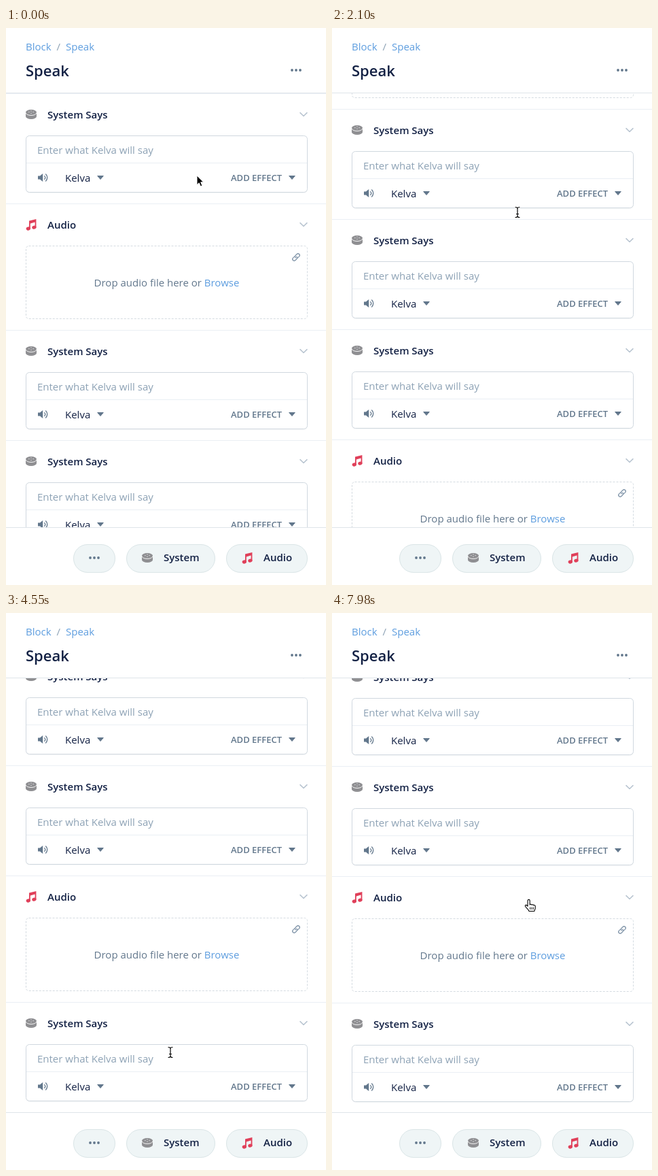
Animation of 471 by 819 pixels, one loop 8000 ms. Source, as an HTML page:

```html
<!DOCTYPE html>
<html lang="en">
<head>
<meta charset="utf-8">
<title>Speak block editor</title>
<style>
  html, body { margin: 0; height: 100%; overflow: hidden; background: #fff; }
  svg { display: block; width: 471px; height: 819px; font: 15px "Open Sans", sans-serif; }
  .strong { font-weight: 600; fill: #132144; }
  .link { fill: #5d9ddf; }
  .slate { fill: #62778c; }
  .hint { fill: #8da2b5; }
  .rule { stroke: #eaeff4; }
  .card { fill: #fff; stroke: #d0d8df; }
  .drop { fill: none; stroke: #d4dbe1; stroke-dasharray: 3 2; }
  .pill { fill: #eff5f6; stroke: #dae5e7; }
  .thin { fill: none; stroke: #8296aa; stroke-width: 1.3; stroke-linecap: round; }
  .back { fill: #fff; }
  .held .back { filter: drop-shadow(0 2px 6px #13214430); }
</style>
</head>
<body>
<svg viewBox="0 0 471 819">
  <defs>
    <clipPath id="view"><path d="M0 96H471V734H0z"/></clipPath>

    <g id="puck">
      <path d="M-8-3a8 4 0 0 1 16 0v6a8 4 0 0 1-16 0z" fill="#8f8f92"/>
      <path d="M-8-2.5a8 4 0 0 0 16 0" fill="none" stroke="#fff" stroke-width=".9"/>
      <path d="M-4-3.4h1.6M2.4-3.4h1.6M-.8-5h1.6M-.8-1.6h1.6" stroke="#d9d9dc"/>
    </g>
    <g id="note" fill="#e0405a">
      <path d="M-3-5.4 7.4-8V4.4H5.6V-3.4L-1.2-1.6V6.2H-3z"/>
      <ellipse cx="-4.2" cy="6" rx="3.2" ry="2.5" transform="rotate(-15 -4.2 6)"/>
      <ellipse cx="4.4" cy="4.2" rx="3.2" ry="2.5" transform="rotate(-15 4.4 4.2)"/>
    </g>
    <path id="chevron" d="M-5-2.3 0 2.5 5-2.3" fill="none" stroke="#b9c5d1" stroke-width="1.6" stroke-linecap="round" stroke-linejoin="round"/>
    <path id="caret" d="M-4.3-2.5H4.3L0 2.5z" fill="#62778c" stroke="#62778c" stroke-linejoin="round"/>
    <g id="speaker">
      <path d="M-7-2.6h3L.2-6V6L-4 2.6h-3z" fill="#62778c"/>
      <path class="thin" d="M2.6-2.4a3.4 3.4 0 0 1 0 4.8M4.6-5a7 7 0 0 1 0 10" style="stroke:#62778c"/>
    </g>
    <g id="chain" class="thin" transform="rotate(-45)">
      <path d="M-.8-2.4H-4a2.4 2.4 0 0 0 0 4.8h2.6a2.4 2.4 0 0 0 2.4-2.4"/>
      <path d="M.8 2.4H4a2.4 2.4 0 0 0 0-4.8H1.4A2.4 2.4 0 0 0-1 0"/>
    </g>
    <g id="dots" class="slate"><circle cx="-6" r="1.9"/><circle r="1.9"/><circle cx="6" r="1.9"/></g>

    <g id="system">
      <path class="back" d="M0 0H471V162H0z"/>
      <path class="rule" d="M0 .5H471"/>
      <use href="#puck" x="37" y="31"/>
      <text class="strong" x="61" y="37">System Says</text>
      <use href="#chevron" x="438" y="31"/>
      <rect x="29.5" y="63.5" width="414" height="83" rx="5" fill="#13214412"/>
      <rect class="card" x="29.5" y="62.5" width="414" height="83" rx="5"/>
      <path class="rule" d="M30 102.5H443"/>
      <text class="hint" x="46" y="89">Enter what Kelva will say</text>
      <use href="#speaker" x="54" y="124"/>
      <text x="87" y="130" fill="#132144">Kelva</text>
      <use href="#caret" x="139" y="124"/>
      <text class="slate" x="331" y="129" font-size="13" font-weight="600">ADD EFFECT</text>
      <use href="#caret" x="421" y="124"/>
    </g>
    <g id="audio">
      <path class="back" d="M0 0H471V186H0z"/>
      <path class="rule" d="M0 .5H471"/>
      <use href="#note" x="37" y="31"/>
      <text class="strong" x="61" y="37">Audio</text>
      <use href="#chevron" x="438" y="31"/>
      <rect class="drop" x="29.5" y="62.5" width="414" height="107" rx="4"/>
      <use href="#chain" x="427" y="79"/>
      <text class="slate" x="236.5" y="122" text-anchor="middle">Drop audio file here or <tspan class="link">Browse</tspan></text>
    </g>

    <path id="arrow" d="M0 0V13.6L3.2 10.7 5.4 15.8 7.8 14.8 5.7 9.8H9.8z" stroke="#fff"/>
    <g id="hand" stroke="#000" stroke-linejoin="round">
      <path d="M-3 1a1.6 1.6 0 0 1 3.2 0v6c.5-1 2.6-.9 2.9.3.7-.9 2.5-.6 2.7.6.9-.7 2.4-.3 2.4 1.2v3c0 2-1.4 2.6-1.4 4.4H-1C-1 14.5-5.6 11.5-6.6 9c-.5-1.6 1.2-2.2 2.4-1L-3 9.2z" fill="#fff" stroke-width="1.1"/>
      <path d="M.7 10.5V14M3 10.5V14M5.3 10.5V14" stroke-width=".9"/>
    </g>
    <path id="stem" d="M-3-7.5Q0-7.5 0-5.5Q0-7.5 3-7.5M0-5.5V5.5M-3 7.5Q0 7.5 0 5.5Q0 7.5 3 7.5M-1.5 2.5h3" fill="none" stroke-linecap="round"/>
    <g id="beam">
      <use href="#stem" stroke="#fff" stroke-width="3"/>
      <use href="#stem" stroke="#000" stroke-width="1.2"/>
    </g>
  </defs>

  <g id="list" clip-path="url(#view)"></g>

  <text class="link" x="29" y="33">Block</text>
  <text class="hint" x="74.5" y="33">/</text>
  <text class="link" x="88" y="33">Speak</text>
  <text class="strong" x="29" y="71" font-size="22">Speak</text>
  <use href="#dots" x="427" y="62"/>
  <path d="M0 95.5H471M0 734.5H471" stroke="#dfe4e9"/>

  <rect class="pill" x="99.5" y="759.5" width="61" height="41" rx="20.5"/>
  <use href="#dots" x="130" y="779"/>
  <rect class="pill" x="177.5" y="759.5" width="130" height="41" rx="20.5"/>
  <use href="#puck" x="208" y="779"/>
  <text class="strong" x="232" y="784">System</text>
  <rect class="pill" x="324.5" y="759.5" width="119" height="41" rx="20.5"/>
  <use href="#note" x="355" y="779"/>
  <text class="strong" x="379" y="784">Audio</text>

  <use id="cursor"/>
</svg>
<script>
const LOOP = 8000, STEP = 70;
const HEIGHT = { system: 162, audio: 186 };
const LIFTED = 4, PASSED = 5;

// Tracks are [time, value] pairs joined by a monotone cubic.
const scrolling = [[490, 0], [1400, 166], [2100, 325], [2870, 448], [3430, 544], [7630, 544], [7980, 381]];
const cursorX = [[140, 281], [420, 273], [4130, 273], [4550, 242], [4970, 252], [5040, 252], [5810, 262], [7140, 262], [7560, 291]];
const cursorY = [[140, 217], [420, 271], [4130, 271], [4550, 646], [4970, 262], [5040, 262], [5810, 487], [7140, 487], [7560, 422]];
const lift = [[5040, 0], [5810, 225], [6090, HEIGHT.audio]];
const makeRoom = [[5320, 0], [5530, -HEIGHT.system]];
const pointers = [[0, 'arrow'], [350, 'hand'], [1750, 'beam'], [3430, 'hand'], [4480, 'beam'], [4690, 'hand'], [5880, 'beam'], [7280, 'hand']];

function sample(track, t) {
  const last = track.length - 1;
  if (t <= track[0][0]) return track[0][1];
  if (t >= track[last][0]) return track[last][1];
  const i = track.findIndex(key => key[0] > t) - 1;
  const slope = k => k < 0 || k >= last ? 0 : (track[k + 1][1] - track[k][1]) / (track[k + 1][0] - track[k][0]);
  const tangent = k => {
    const a = slope(k - 1), b = slope(k);
    return a * b > 0 ? 2 * a * b / (a + b) : 0;
  };
  const [t0, v0] = track[i], [t1, v1] = track[i + 1];
  const span = t1 - t0, u = (t - t0) / span, w = 1 - u;
  return v0 * w * w * (1 + 2 * u) + v1 * u * u * (3 - 2 * u)
    + span * u * w * (tangent(i) * w - tangent(i + 1) * u);
}

const list = document.getElementById('list');
const cursor = document.getElementById('cursor');

let nextY = 96;
const items = ['system', 'audio', 'system', 'system', 'system', 'audio', 'system'].map(kind => {
  const node = document.createElementNS('http://www.w3.org/2000/svg', 'use');
  node.setAttribute('href', '#' + kind);
  list.append(node);
  const item = { node, y: nextY };
  nextY += HEIGHT[kind];
  return item;
});
const lifted = items[LIFTED].node;
list.append(lifted);

function place(node, x, y) {
  node.setAttribute('transform', `translate(${Math.round(x)} ${Math.round(y)})`);
}

function draw(now) {
  const t = Math.floor(now % LOOP / STEP) * STEP;
  const offset = sample(scrolling, t);
  items.forEach(({ node, y }, i) => {
    const shift = i === LIFTED ? sample(lift, t) : i === PASSED ? sample(makeRoom, t) : 0;
    place(node, 0, y + shift - offset);
  });
  // Styles inside a use element only inherit, so the shadow goes on the whole item.
  lifted.style.filter = t > 5040 && t < 6090 ? 'drop-shadow(0 2px 6px #13214430)' : '';
  place(cursor, sample(cursorX, t), sample(cursorY, t));
  cursor.setAttribute('href', '#' + pointers.findLast(([start]) => start <= t)[1]);
}

const began = performance.now();
function tick() {
  draw(performance.now() - began);
  requestAnimationFrame(tick);
}
tick();
</script>
</body>
</html>
```
